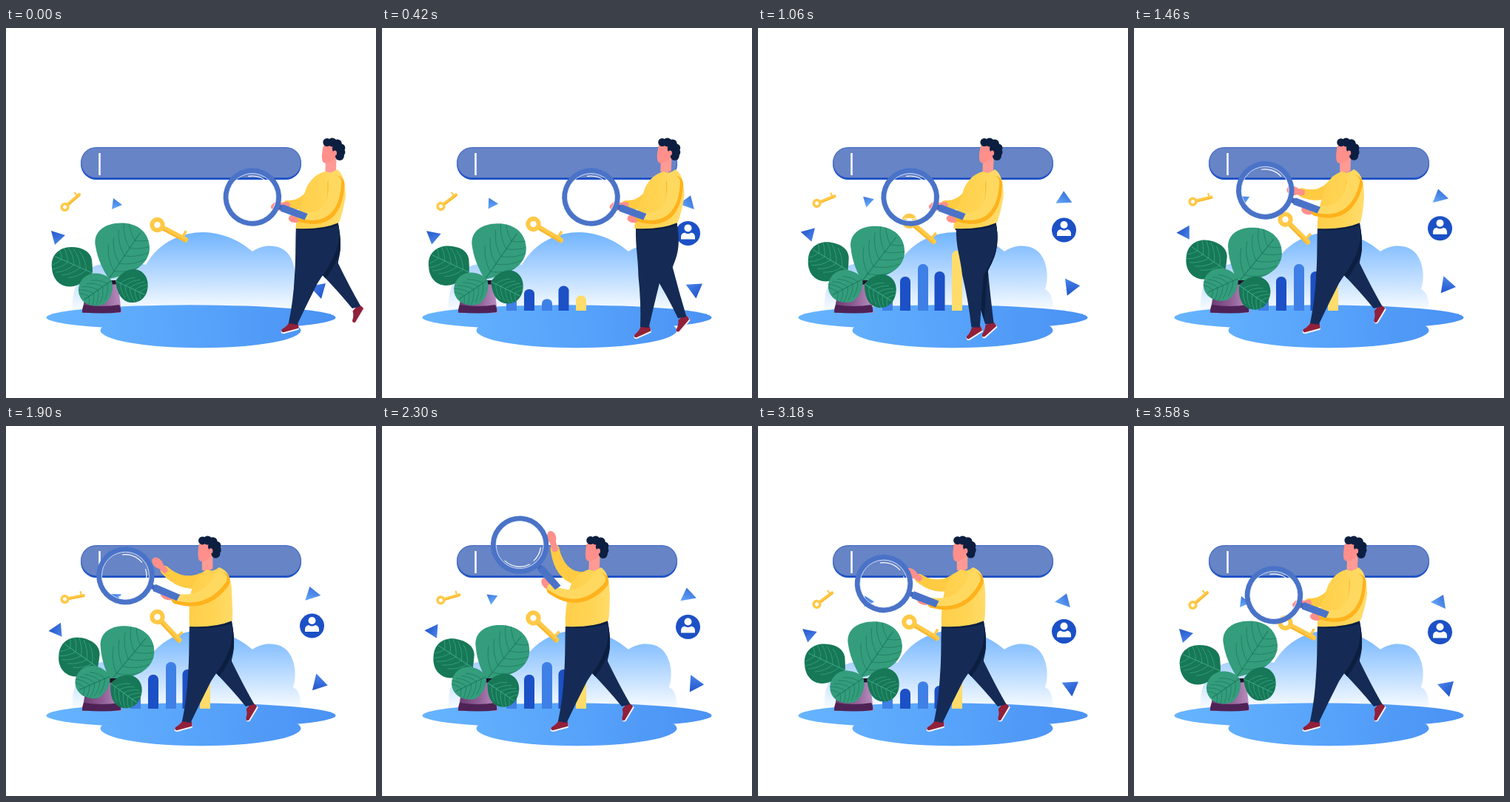
An HTML page with a canvas that plays this animation: 500x500 px, repeating every 3600 ms.

```html
<!DOCTYPE html>
<html lang="en">
<head>
<meta charset="utf-8">
<title>Search walk</title>
<style>
html, body { margin: 0; width: 100%; height: 100%; overflow: hidden; background: #fff; }
canvas { display: block; width: 500px; height: 500px; }
</style>
</head>
<body>
<canvas id="stage" width="500" height="500"></canvas>
<script>
const ctx = document.getElementById('stage').getContext('2d');
const LOOP = 3600, WALK = 1200, STEP = 600, TAU = Math.PI * 2, DEG = Math.PI / 180;
const SKIN = '#ff8f8b', NAVY = '#152b56', DARK = '#0c1f40', BLUE = '#1c50c6';

const lerp = (a, b, k) => a + (b - a) * k;
const clamp = k => Math.min(1, Math.max(0, k));
const ease = k => (1 - Math.cos(Math.PI * clamp(k))) / 2;

function gradient(x0, y0, x1, y1, ...colors) {
  const g = ctx.createLinearGradient(x0, y0, x1, y1);
  colors.forEach((c, i) => g.addColorStop(i / (colors.length - 1), c));
  return g;
}
function fill(path, color) {
  ctx.fillStyle = color;
  ctx.fill(typeof path === 'string' ? new Path2D(path) : path);
}
function dot(x, y, r, color, ry = r, turn = 0) {
  ctx.beginPath();
  ctx.ellipse(x, y, r, ry, turn, 0, TAU);
  ctx.fillStyle = color;
  ctx.fill();
}
function rounded(x, y, w, h, r, color) {
  ctx.beginPath();
  ctx.roundRect(x, y, w, h, r);
  ctx.fillStyle = color;
  ctx.fill();
}
function line(x0, y0, x1, y1, width, color, cap = 'round') {
  ctx.beginPath();
  ctx.moveTo(x0, y0);
  ctx.lineTo(x1, y1);
  ctx.lineWidth = width;
  ctx.strokeStyle = color;
  ctx.lineCap = cap;
  ctx.stroke();
}
function placed(x, y, angle, draw) {
  ctx.save();
  ctx.translate(x, y);
  ctx.rotate(angle);
  draw();
  ctx.restore();
}
function turned(x, y, angle, draw) {
  placed(x, y, angle, () => { ctx.translate(-x, -y); draw(); });
}
// Tapered limb along a quadratic curve
function limb([x0, y0, cx, cy, x1, y1], w0, w1, color) {
  ctx.beginPath();
  for (let i = 0; i <= 60; i++) {
    const k = i / 60, j = 1 - k;
    const x = j * j * x0 + 2 * j * k * cx + k * k * x1;
    const y = j * j * y0 + 2 * j * k * cy + k * k * y1;
    const r = lerp(w0, w1, k) / 2;
    ctx.moveTo(x + r, y);
    ctx.arc(x, y, r, 0, TAU);
  }
  ctx.fillStyle = color;
  ctx.fill();
}

function drawSearchBar() {
  rounded(101, 163, 298, 42, 21, BLUE);
  rounded(101, 161, 298, 41.5, 20.7, '#4068c4');
  rounded(102, 162, 296, 40, 20, '#6684c6');
  line(126.5, 169, 126.5, 199, 2.6, '#fff', 'butt');
}

function drawCloud() {
  fill('M90 383C88 345 104 319 140 318Q170 314 189 320C207 289 237 276 267 276C295 277 317 288 333 302' +
    'C348 291 372 292 382 306C391 318 393 338 388 353C396 357 399 366 398 383Z',
    gradient(0, 276, 0, 383, '#70b4ff', '#b5d8ff', '#fafdff'));
}

function drawGround() {
  const blue = gradient(55, 0, 445, 0, '#66b4ff', '#58a4fb', '#4a92f4');
  dot(250, 391.3, 195.5, blue, 17);
  dot(263, 408.5, 135.5, blue, 23.7);
}

function drawBars(t) {
  const shrink = ease((LOOP - 20 - t) / 720);
  const grow = [0, 180].map(delay => Math.min(ease((t - delay) / 720), shrink));
  [[168, 32, '#3f80e6', 0], [192, 46, BLUE, 0], [216, 63, '#3f80e6', 1],
   [238.5, 53, BLUE, 0], [262, 81, '#ffdc6c', 1]].forEach(([x, full, color, late]) => {
    const h = full * grow[late], r = Math.min(6.5, h);
    if (h > 0.5) rounded(x, 382 - h, 14, h, [r, r, 0, 0], color);
  });
}

function drawTriangle([ax, ay, bx, by, cx, cy], rise, angle, light, dark) {
  const mx = (ax + bx + cx) / 3, my = (ay + by + cy) / 3;
  placed(mx, my - rise, angle * DEG, () => {
    ctx.translate(-mx, -my);
    fill(`M${ax} ${ay}L${bx} ${by}L${cx} ${cy}Z`, gradient(ax, ay, cx, cy, light, dark));
  });
}

function drawKey(x, y, angle, size) {
  placed(x, y, angle * DEG, () => {
    ctx.scale(size, size);
    line(9, 0, 43, 0, 7, '#ffc947');
    line(10, 2.2, 43, 2.2, 2, '#f9b52c');
    line(38, 0, 38, -11, 3.5, '#ffc947', 'butt');
    ctx.beginPath();
    ctx.arc(0, 0, 7.2, 0, TAU);
    ctx.lineWidth = 6;
    ctx.strokeStyle = '#ffc947';
    ctx.stroke();
  });
}

function drawFloaters(u) {
  drawTriangle([61, 274, 80, 280, 66, 293], 6.5 * u, -52 * u, '#2458cc', '#4a82e8');
  drawTriangle([145, 230, 157, 239, 143, 245], 6.5 * u, -37 * u, '#3d78dd', '#68acfb');
  drawTriangle([418, 228, 421, 247, 401, 238], 10.5 * u, -42 * u, '#3c74dc', '#66a8fa');
  drawTriangle([410, 349, 432, 345, 426, 366], 6 * u, 57 * u, '#4a84ea', '#2055cb');
  drawKey(79.5, 242 - 8 * u, -41 + 30 * u, 0.6);
  drawKey(204.5, 266 - 8 * u, 28 + 19 * u, 1);
  const y = 278.5 - 8.5 * u;
  dot(413.5, y, 16.5, BLUE);
  dot(413.5, y - 7, 5, '#fff');
  fill(`M404 ${y + 8}V${y + 5}Q404 ${y} 409 ${y - 1}Q413.5 ${y + 2} 418 ${y - 1}Q423 ${y} 423 ${y + 5}V${y + 8}Z`, '#fff');
}

function drawLeaf(shape, color, vein, [x0, y0, x1, y1]) {
  const path = new Path2D(shape);
  fill(path, color);
  ctx.save();
  ctx.clip(path);
  line(x0, y0, x1, y1, 1.1, vein);
  const dx = (x1 - x0) / 6, dy = (y1 - y0) / 6;
  for (let i = 1; i < 6; i++) {
    const x = x0 + dx * i, y = y0 + dy * i;
    for (const s of [-1, 1]) {
      ctx.beginPath();
      ctx.moveTo(x, y);
      ctx.quadraticCurveTo(x + dx * 0.7 - s * dy * 1.4, y + dy * 0.7 + s * dx * 1.4,
        x + dx * 2 - s * dy * 2.1, y + dy * 2 + s * dx * 2.1);
      ctx.lineWidth = 0.8;
      ctx.stroke();
    }
  }
  ctx.restore();
}

function drawPlant(u) {
  const LIGHT = '#349d7c', DEEP = '#167856', V1 = '#1f7c61', V2 = '#38a283';
  turned(90, 365, 0.1 * u, () => drawLeaf(
    'M121 295C117 275 134 263 157 263.5C180 264 194 278 194 298C193 320 172 332 139 339C133 330 124 314 121 295Z',
    LIGHT, V1, [139, 339, 181, 277]));
  turned(144, 364, 0.2 * u, () => drawLeaf(
    'M62 324C60 307 72 296 88 296C103 296 114 302 116 313Q117 322 117 331C109 339 101 349 86 349.5C72 349 63 339 62 324Z',
    DEEP, V2, [117, 331, 67, 309]));
  fill('M110 342H151L156 385H103Z', gradient(105, 0, 154, 0, '#6c3d73', '#8d5c94', '#b78cbd'));
  fill('M110 341H151L151.5 346Q130 348 110 346Z', '#23112c');
  fill('M105 374Q130 378 153 374Q156 379 155 384Q130 387 103 384Q103 378 105 374Z', '#4f2256');
  turned(156, 328, 0.2 * u, () => drawLeaf(
    'M98 356C97 342 108 331 122 331.5C132 332 139 336 143 342C146 352 142 366 133 373C119 379 100 374 98 356Z',
    LIGHT, V1, [143, 341, 106, 367]));
  turned(115, 312, 0.2 * u, () => drawLeaf(
    'M148 342C154 332 164 325 175 326C187 328 193 339 191.5 351C190 365 180 372 169 371C157 370 150 359 148 342Z',
    DEEP, V2, [148, 342, 187, 360]));
}

// Arm rows: shoulder, bend, wrist
const REST = { lens: [189, 228.5, 20], body: [295, 313, 268, 0, 0],
  near: [302, 211, 302, 266, 256, 256], far: [280, 209, 264, 242, 236, 239], hands: [247, 257, 223, 241] };
const LOW = { lens: [159.5, 205.5, 20.5], body: [279, 303, 258, -24, -3],
  near: [291, 209, 270, 243, 230, 235], far: [266, 208, 238, 219, 213, 197], hands: [217, 230, 203, 188] };
const HIGH = { lens: [188, 157.5, 50], body: [288, 306, 261, -7, 0],
  near: [295, 210, 266, 244, 229, 220], far: [272, 207, 241, 204, 235, 164], hands: [223, 212, 231, 148] };
const LOWERED = { ...LOW, lens: [165, 209, 21] };
const POSES = [REST, LOW, HIGH, LOWERED, REST];

function poseAt(t) {
  const s = Math.max(0, t - WALK) / STEP, i = Math.min(3, Math.floor(s)), k = ease(s - i);
  const pose = {};
  for (const part in REST) pose[part] = POSES[i][part].map((v, n) => lerp(v, POSES[i + 1][part][n], k));
  return pose;
}

function stride(t) {
  const keys = [[0, 0], [600, 180], [1060, 282], [WALK, 360]];
  for (let i = 1; i < keys.length; i++) {
    const [t0, a0] = keys[i - 1], [t1, a1] = keys[i];
    if (t < t1) return Math.cos(lerp(a0, a1, (t - t0) / (t1 - t0)) * DEG);
  }
  return 1;
}

// c runs from 1 (forward) to -1 (back)
function legAt(c) {
  const k = (1 - c) / 2;
  const x = 287 - 43 * c, y = 390 + 10 * c + 14 * (1 - c * c);
  const kl = [lerp(246, 280, k), lerp(336, 330, k)], kr = [lerp(277, 305, k), lerp(345, 318, k)];
  const hip = lerp(248, 256, k);
  const path = new Path2D(`M${hip} 269C${hip - 1} 295 ${kl[0] + lerp(2, -8, k)} 312 ${kl[0]} ${kl[1]}` +
    `Q${lerp(kl[0], x - 5, 0.5) + 2} ${lerp(kl[1], y, 0.5)} ${x - 6} ${y - 1}L${x + 5.5} ${y + 1 - 5 * k}` +
    `Q${lerp(kr[0], x + 5, 0.5)} ${lerp(kr[1], y, 0.5)} ${kr[0]} ${kr[1]}` +
    `C${lerp(288, 305, k)} ${lerp(328, 312, k)} 312 300 305 264Z`);
  return { path, x, y, turn: -(33 - 22 * c) * DEG };
}
function drawLeg({ path, x, y, turn }) {
  placed(x, y, turn, () => {
    fill('M6 -1Q8 4 6 9L-15 10.500Q-20 9 -17 5Q-9 3 -5 -2Z', '#f4f4fa');
    fill('M6 -2Q8 3 6 7L-15 8.500Q-19 7 -16 4Q-9 2 -5 -3Z', '#92203a');
  });
  fill(path, NAVY);
}
function drawLegs(c) {
  const near = legAt(c), far = legAt(-c);
  drawLeg(far);
  ctx.save();
  ctx.clip(far.path);
  ctx.translate(5, 3);
  fill(near.path, DARK);
  ctx.restore();
  drawLeg(near);
}

function drawHead(dx, tilt) {
  ctx.save();
  ctx.translate(dx, 0);
  turned(297, 188, tilt * DEG, () => {
    fill('M288 178L287.5 194Q295 198 302 193L303 170Z', '#ff9a94');
    fill('M285 159Q283 168 283 174Q283 183 288 182.500Q296 182 301 175L305 158Z', SKIN);
    for (const [x, y, r] of [[290, 154.5, 5.5], [297, 154.5, 6], [304, 156.5, 6], [309, 162, 5.5],
      [304, 163, 7], [308, 168, 6.5], [307, 173, 6]]) dot(x, y, r, DARK);
    dot(300.5, 169, 2.7, SKIN, 3.5);
  });
  ctx.restore();
}

function drawTorso([neck, right, left]) {
  fill(`M${neck - 8} 194Q${neck} 198 ${neck + 8} 191C${right - 2} 195 ${right + 2} 208 ${right + 2} 228` +
    `Q${lerp(right, 306, 0.5) + 2} 250 306 263Q282 273 248 271C247 255 ${left - 11} 232 ${left - 6} 216` +
    `Q${left + 3} 198 ${neck - 8} 194Z`, gradient(250, 0, 312, 0, '#ffcf4a', '#ffd453', '#ffdc6c'));
}

function drawSleeve(arm, w0, w1) {
  limb(arm, w0, w1, '#ffb21c');
  limb(arm.map((v, i) => i % 2 ? v - 3 : v - 1.5), w0 - 5, w1 - 4, '#ffd95f');
}

function drawHand(wrist, [x, y]) {
  line(wrist[0], wrist[1], x, y, 8, SKIN);
  dot(x, y, 9, SKIN, 6, Math.atan2(y - wrist[1], x - wrist[0]));
}

function drawLens([x, y, angle]) {
  placed(x, y, angle * DEG, () => {
    line(37, 0, 48, 0, 7, '#4068bd', 'butt');
    fill('M42 -5L78 -4.500L77 5L42 5Z', '#4a73c8');
    ctx.lineCap = 'round';
    const arc = (r, from, to, width, color) => {
      ctx.beginPath();
      ctx.arc(0, 0, r, from * DEG, to * DEG);
      ctx.lineWidth = width;
      ctx.strokeStyle = color;
      ctx.stroke();
    };
    arc(35.7, 0, 360, 7, '#4a73c8');
    arc(32, 0, 360, 0.8, '#dbe6fa');
    arc(28.5, -120, -62, 1.2, '#fff');
    arc(28.5, -40, 0, 1.2, '#fff');
    arc(29.500, 15, 85, 1.1, '#fff');
  });
}

function drawPerson(t) {
  const pose = poseAt(t), walking = clamp(t / WALK);
  ctx.save();
  ctx.translate(144 * (1 - walking), 0);
  drawLegs(stride(t));
  limb(pose.far, 20, 12, '#ffcb42');
  drawHand(pose.far.slice(4), pose.hands.slice(2));
  const nod = t < WALK ? -6 * Math.sin(Math.PI * walking) ** 2 : 0;
  drawHead(pose.body[3] + nod, pose.body[4]);
  fill('M249 265L305 259L305 267Q280 275 250 273Z', DARK);
  drawTorso(pose.body);
  drawHand(pose.near.slice(4), pose.hands);
  drawSleeve(pose.near, 23, 13);
  drawLens(pose.lens);
  ctx.restore();
}

function render(t) {
  const sway = (1 - Math.cos(TAU * t / LOOP)) / 2;
  ctx.fillStyle = '#fff';
  ctx.fillRect(0, 0, 500, 500);
  drawSearchBar();
  drawCloud();
  drawGround();
  drawBars(t);
  drawFloaters(sway);
  drawPlant(sway);
  drawPerson(t);
}

const start = performance.now();
function frame() {
  render((performance.now() - start) % LOOP);
  requestAnimationFrame(frame);
}
frame();
</script>
</body>
</html>
```
